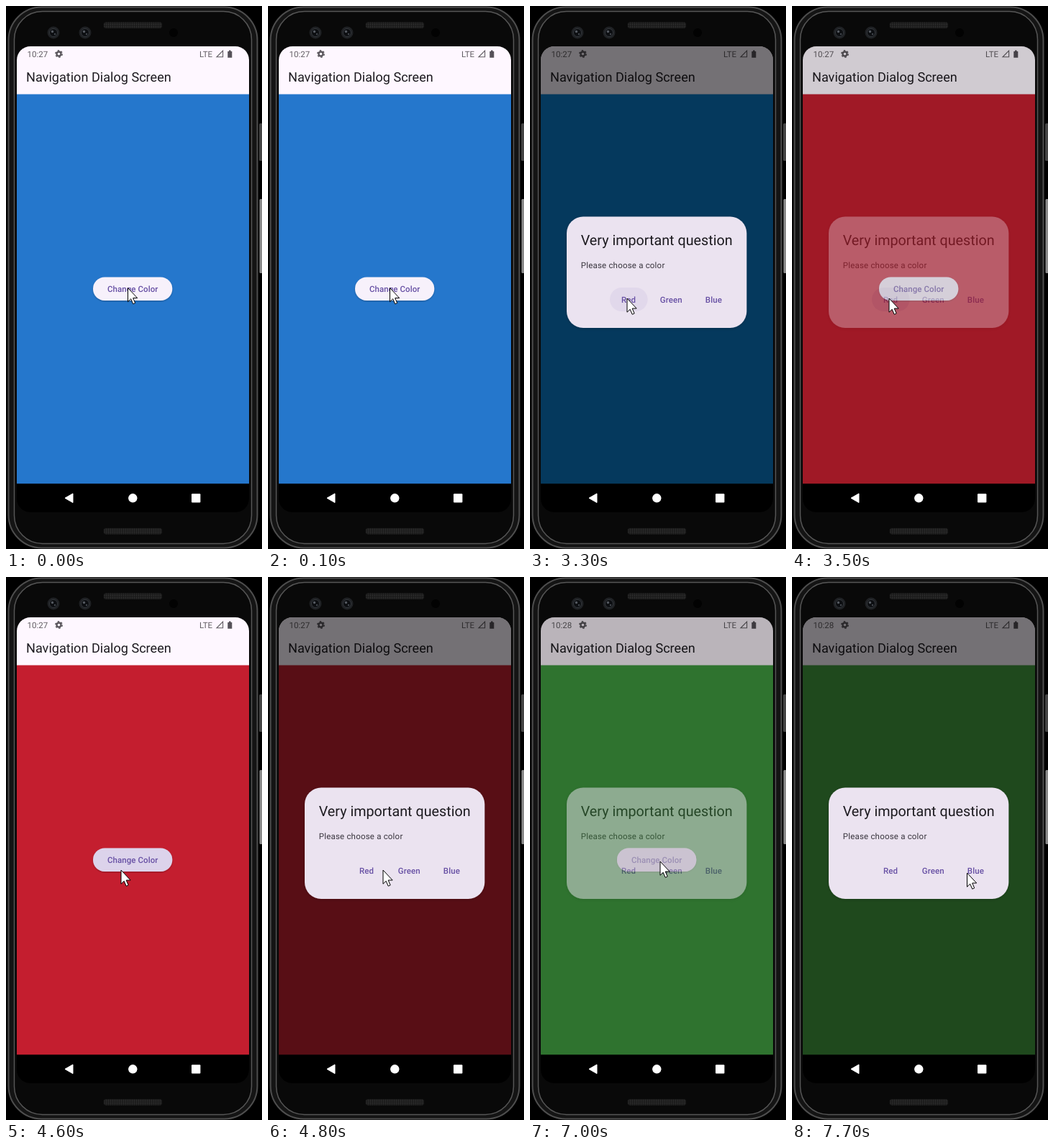
These frames come from a looping animation (356x754 px, 8 s). An HTML page:

```html
<!DOCTYPE html>
<html lang="en">
<head>
<meta charset="utf-8">
<title>Navigation Dialog Screen</title>
<style>
  html, body { margin: 0; width: 100%; height: 100%; overflow: hidden; background: #000; }
  svg { display: block; width: 356px; height: 754px; }
  text { font-family: Roboto, "Noto Sans", sans-serif; white-space: pre; text-rendering: geometricPrecision; }
  .status { font-size: 11.5px; fill: #625e63; }
  .title { font-size: 18.1px; fill: #1d1b20; }
  .heading { font-size: 19.74px; fill: #1d1b20; }
  .message { font-size: 11.5px; letter-spacing: .2px; fill: #39353e; }
  .label { font-size: 11.5px; font-weight: 500; letter-spacing: .08px; fill: #6750a4; text-anchor: middle; }
  .ripple { fill: #6750a4; opacity: 0; }
</style>
</head>
<body>
<svg viewBox="0 0 356 754">
  <defs>
    <clipPath id="glass"><rect x="15" y="56" width="323" height="647" rx="19"/></clipPath>
    <pattern id="mesh" width="3" height="3" patternUnits="userSpaceOnUse">
      <rect width="3" height="3" fill="#1a1a1a"/><circle cx="1.5" cy="1.5" r=".9" fill="#303030"/>
    </pattern>
    <filter id="lift" x="-10%" y="-20%" width="120%" height="150%">
      <feDropShadow dx="0" dy="1" stdDeviation="1" flood-opacity=".3"/>
    </filter>
    <filter id="float" x="-10%" y="-10%" width="120%" height="125%">
      <feDropShadow dx="0" dy="1" stdDeviation="2" flood-opacity=".2"/>
    </filter>
  </defs>

  <!-- phone body -->
  <rect x="352" y="163" width="5" height="52" rx="1.5" fill="#444"/>
  <rect x="352.5" y="268" width="4" height="103" rx="1.5" fill="#8a8a8a"/>
  <rect x="3.5" y="1.5" width="346" height="751" rx="46" fill="#141414" stroke="#4e4e4e" stroke-width="2"/>
  <rect x="11.5" y="7.5" width="330" height="739" rx="39" fill="#090909" stroke="#565656" stroke-width="1.5"/>
  <g fill="url(#mesh)">
    <rect x="136" y="22.5" width="81" height="8.5" rx="3"/>
    <rect x="136" y="725" width="81" height="8.5" rx="3"/>
  </g>
  <g id="lenses"></g>
  <circle cx="233" cy="37" r="6" fill="#020202"/>

  <!-- app -->
  <g clip-path="url(#glass)">
    <rect x="15" y="56" width="323" height="68" fill="#fef7ff"/>
    <text id="clock" class="status" x="29.5" y="71">10:27</text>
    <g transform="translate(73.5 66.5)" fill="none" stroke="#5a565c">
      <circle r="3" stroke-width="2.4"/>
      <circle r="4.7" stroke-width="1.5" stroke-dasharray="2.46 2.46"/>
    </g>
    <text class="status" x="269" y="70.5">LTE</text>
    <path d="M293 70.8H301.6V62.2Z" fill="none" stroke="#625e63" stroke-width="1.1"/>
    <path d="M308.3 63H310V61.6H312.6V63H314.3V71.8H308.3Z" fill="#555158"/>
    <text class="title" x="28" y="105">Navigation Dialog Screen</text>
    <rect id="dimBar" x="15" y="56" width="323" height="68"/>
    <rect id="page" x="15" y="122.5" width="323" height="541"/>
    <rect x="121" y="376.5" width="110.3" height="32.5" rx="16.3" fill="#f7f1fb" filter="url(#lift)"/>
    <rect id="pressMain" class="ripple" x="121" y="376.5" width="110.3" height="32.5" rx="16.3"/>
    <text class="label" x="176.2" y="397">Change Color</text>
    <rect id="dimButton" x="121" y="376.5" width="110.3" height="32.5" rx="16.3"/>
    <g id="dialog">
      <rect x="51" y="292.5" width="250.3" height="154.5" rx="23" fill="#ebe3f0" filter="url(#float)"/>
      <text class="heading" x="70.7" y="332">Very important question</text>
      <text class="message" x="70.7" y="364">Please choose a color</text>
      <rect id="pressChoice" class="ripple" y="391" width="52.6" height="33" rx="16.5"/>
      <text class="label" x="137" y="412">Red</text>
      <text class="label" x="196.2" y="412">Green</text>
      <text class="label" x="255.4" y="412">Blue</text>
    </g>
    <rect x="15" y="663.5" width="323" height="40"/>
    <g fill="#fff">
      <path d="M82 683.3L93 677V689.6Z" stroke="#fff" stroke-linejoin="round"/>
      <circle cx="176.3" cy="683.3" r="6.2"/>
      <rect x="258" y="677.2" width="12.4" height="12.4" rx="1"/>
    </g>
  </g>

  <path id="cursor" d="M0 0V19.2L4.2 15.2L7.2 22.2L10.2 20.9L7.2 14H13.2Z"
        fill="#fff" stroke="#000" stroke-linejoin="round"/>
</svg>
<script>
const LOOP = 8000, STEP = 100, FADE = 300;
const $ = id => document.getElementById(id);

const BLUE = { light: [37, 119, 204], dark: [5, 57, 93] };
const RED = { light: [196, 30, 47], dark: [88, 14, 21], x: 111 };
const GREEN = { light: [63, 157, 64], dark: [31, 73, 29], x: 170 };

// each time the dialog opens, fades in over `rise` ms, and a colour is picked
const visits = [
  { open: 2099, rise: 1, pick: 3300, color: RED },
  { open: 4600, rise: 200, pick: 5600, color: GREEN },
  { open: 6800 + 100, rise: 200, pick: Infinity }
];

const moves = [
  { at: 2500, ms: 300, to: [135, 406] },
  { at: 3700, ms: 400, to: [160, 407] },
  { at: 4900, ms: 400, to: [192, 410] },
  { at: 6100, ms: 400, to: [181, 395] },
  { at: 7100, ms: 600, to: [243.5, 411] }
];

const clamp = k => Math.min(1, Math.max(0, k));
const ease = k => k * k * (3 - 2 * k);
const blend = (a, b, k) => a.map((v, i) => v + (b[i] - v) * k);

const cursorAt = t => moves.reduce(
  (spot, m) => blend(spot, m.to, ease(clamp((t - m.at) / m.ms))), [169.5, 391.5]);

function draw(t) {
  const visit = visits.filter(v => t > v.open - v.rise).pop() || visits[0];
  const { open, rise, pick } = visit;
  const shown = clamp((t - open) / rise) * clamp(1 - (t - pick) / FADE);
  const press = clamp((t - open + rise) / rise) * clamp(1 - (t - open) / rise);
  const choice = clamp((t - pick + STEP) / (2 * STEP));

  const past = visits.filter(v => t > v.pick).pop();
  const color = past ? past.color : BLUE;
  const rgb = blend(color.light, color.dark, shown).map(Math.round);

  $('page').setAttribute('fill', `rgb(${rgb})`);
  $('dimBar').style.opacity = $('dimButton').style.opacity = .54 * shown;
  $('dialog').style.opacity = shown;
  $('pressMain').style.opacity = .19 * press;
  $('pressChoice').style.opacity = .14 * choice;
  if (visit.color) $('pressChoice').setAttribute('x', visit.color.x);
  $('clock').textContent = t < 7000 ? '10:27' : '10:28';
  $('cursor').setAttribute('transform', `translate(${cursorAt(t)})`);
}

$('lenses').innerHTML = [66, 110].map(x => `<g transform="translate(${x} 37)">
  <circle r="8.5" fill="#1f2124"/><circle r="5.5" fill="#0c0e11" stroke="#33373c"/>
  <circle cx="-1.5" cy="-1.5" r="1.7" fill="#555a61"/><circle cx="2" cy="2" r="1.2" fill="#43474e"/></g>`).join('');

const start = performance.now();
function tick() {
  const t = (performance.now() - start) % LOOP;
  draw(Math.floor(t / STEP) * STEP);
  requestAnimationFrame(tick);
}
tick();
</script>
</body>
</html>
```
